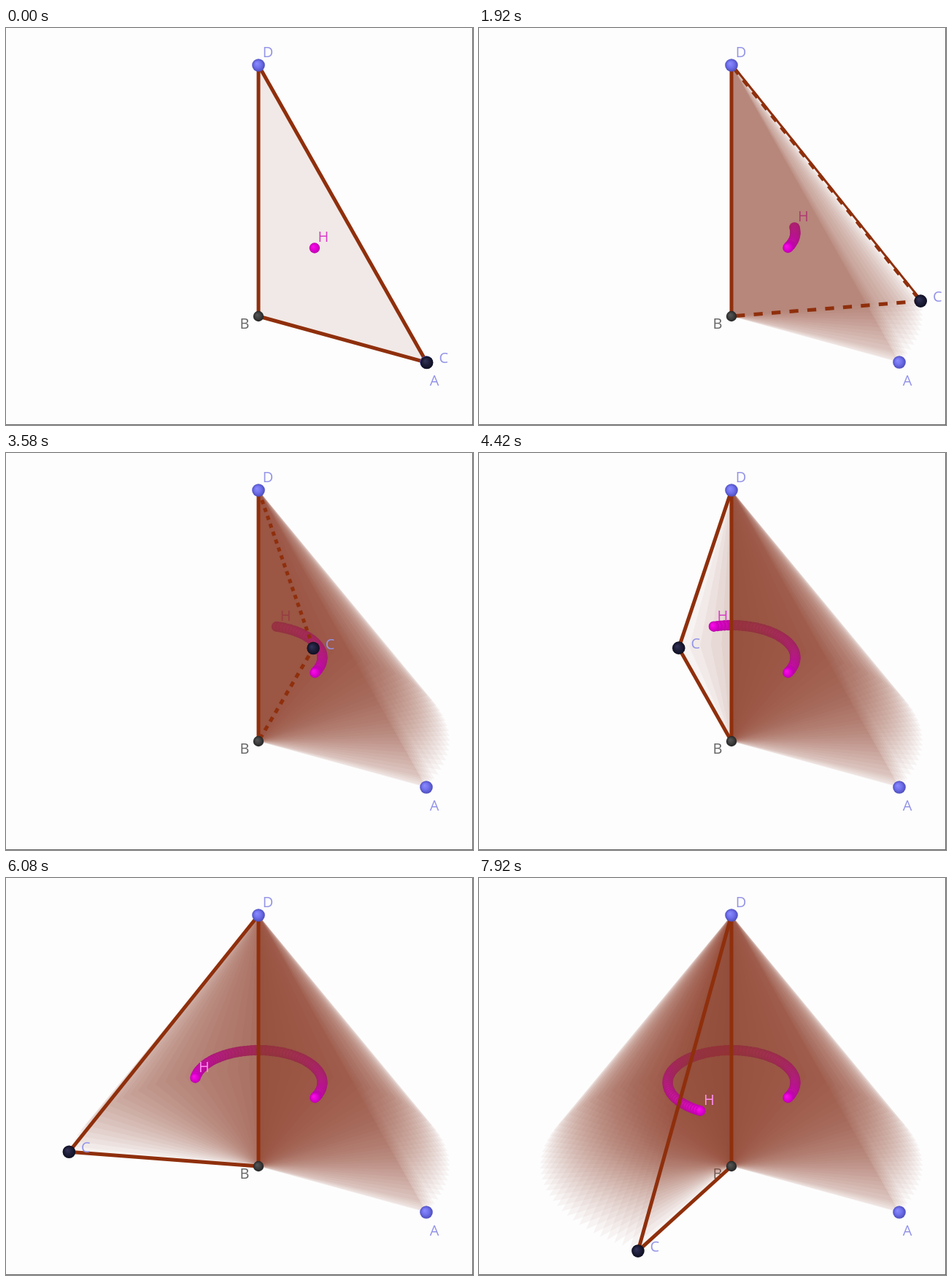
Recreate the animation shown at these times as an HTML page with a canvas. Size 640 by 544 pixels, loop 8 s.

```html
<!DOCTYPE html>
<html>
<head>
<meta charset="utf-8">
<style>
html, body { margin: 0; width: 100%; height: 100%; overflow: hidden; background: #fdfdfd; }
canvas { display: block; }
</style>
</head>
<body>
<canvas id="stage" width="640" height="544"></canvas>
<script>
const g = document.getElementById('stage').getContext('2d');
const LOOP = 8000, STEP = 1000 / 12, FIRST = 8;
const A = [576, 458], B = [346, 395], D = [346, 51];
const RX = 262.5, RY = 133;
const BROWN = '#8f2f0c', LILAC = '#9494e8';

// time in ms, turn in degrees
const turns = [[620, -28.5], [1000, -23], [1917, 9.05], [2833, 44], [4417, 106], [4917, 125.8],
  [5417, 144.4], [5750, 158.3], [6833, 201], [7417, 223.8], [7917, 240.8]];

function angleAt(ms) {
  if (ms <= turns[0][0]) return turns[0][1];
  const i = Math.max(1, turns.findIndex(k => k[0] >= ms));
  const [t0, a0] = turns[i - 1], [t1, a1] = turns[i];
  return a0 + (a1 - a0) * (ms - t0) / (t1 - t0);
}

function pose(n) {
  const deg = angleAt(n * STEP), r = deg * Math.PI / 180;
  const C = [B[0] + RX * Math.cos(r), B[1] - RY * Math.sin(r)];
  const H = [0, 1].map(i => (B[i] + C[i] + D[i]) / 3);
  return { n, deg, C, H, depth: Math.sin(r) };
}

function face(C, alpha) {
  g.fillStyle = `rgba(138,60,38,${alpha})`;
  g.beginPath();
  g.moveTo(...B);
  g.lineTo(...D);
  g.lineTo(...C);
  g.fill();
}

// dashes: how many fit on the edge, 0 for a solid line
function edge(p, q, width = 5, dashes = 0) {
  const unit = dashes && Math.hypot(q[0] - p[0], q[1] - p[1]) / dashes / 2;
  g.strokeStyle = BROWN;
  g.lineWidth = width;
  g.setLineDash(unit ? [unit, unit] : []);
  g.lineDashOffset = -unit / 2;
  g.beginPath();
  g.moveTo(...p);
  g.lineTo(...q);
  g.stroke();
}

function ball([x, y], r, light, mid, dark) {
  const shade = g.createRadialGradient(x - r * .3, y - r * .3, 0, x, y, r);
  shade.addColorStop(0, light);
  shade.addColorStop(.55, mid);
  shade.addColorStop(1, dark);
  g.fillStyle = shade;
  g.beginPath();
  g.arc(x, y, r, 0, 7);
  g.fill();
}

function label(text, x, y, color) {
  g.fillStyle = color;
  g.fillText(text, x, y + 7);
}

function draw(now) {
  const n = Math.min(95, Math.floor((now % LOOP + 4) / STEP));
  const cur = pose(n), { C, H, deg } = cur;
  g.fillStyle = '#fdfdfd';
  g.fillRect(0, 0, 640, 544);
  g.font = '20px "Open Sans", "Noto Sans", sans-serif';
  g.textAlign = 'center';

  label('B', 327, 405, '#666');
  face(A, .1);

  // swept faces and the trace of H, far to near
  const trail = [cur];
  for (let i = FIRST; i < n; i++) trail.push(pose(i));
  trail.sort((p, q) => q.depth - p.depth);
  for (const p of trail) {
    if (p.n >= FIRST) face(p.C, .05);
    ball(p.H, 7.2, '#fa10ea', '#e400d4', '#bc00ae');
    if (p === cur) label('H', H[0] + 12, H[1] - 15, deg > 140 ? '#ff8cee' : '#d83cc8');
  }

  const hidden = deg > -27 && deg < 90;
  edge(B, D);
  edge(B, C, 5, hidden && 10.6);
  edge(D, C, 5, hidden && 20);
  if (hidden && deg < 23) edge([D[0] + 1.5, D[1]], [C[0] + 1.5, C[1]], 3);

  for (const p of [D, A]) ball(p, 8.8, '#8c8cff', '#7070ec', '#4e4ebc');
  ball(B, 7.2, '#585858', '#404040', '#242424');
  ball(C, 8.8, '#34345c', '#1e1e3a', '#0e0e20');
  label('D', 359, 33, LILAC);
  label('A', 587, 483, LILAC);
  label('C', C[0] + 23, C[1] - 6, LILAC);

  g.fillStyle = '#666';
  g.fillRect(0, 543, 640, 1);
  g.fillRect(639, 0, 1, 544);
  requestAnimationFrame(draw);
}
requestAnimationFrame(draw);
</script>
</body>
</html>
```
